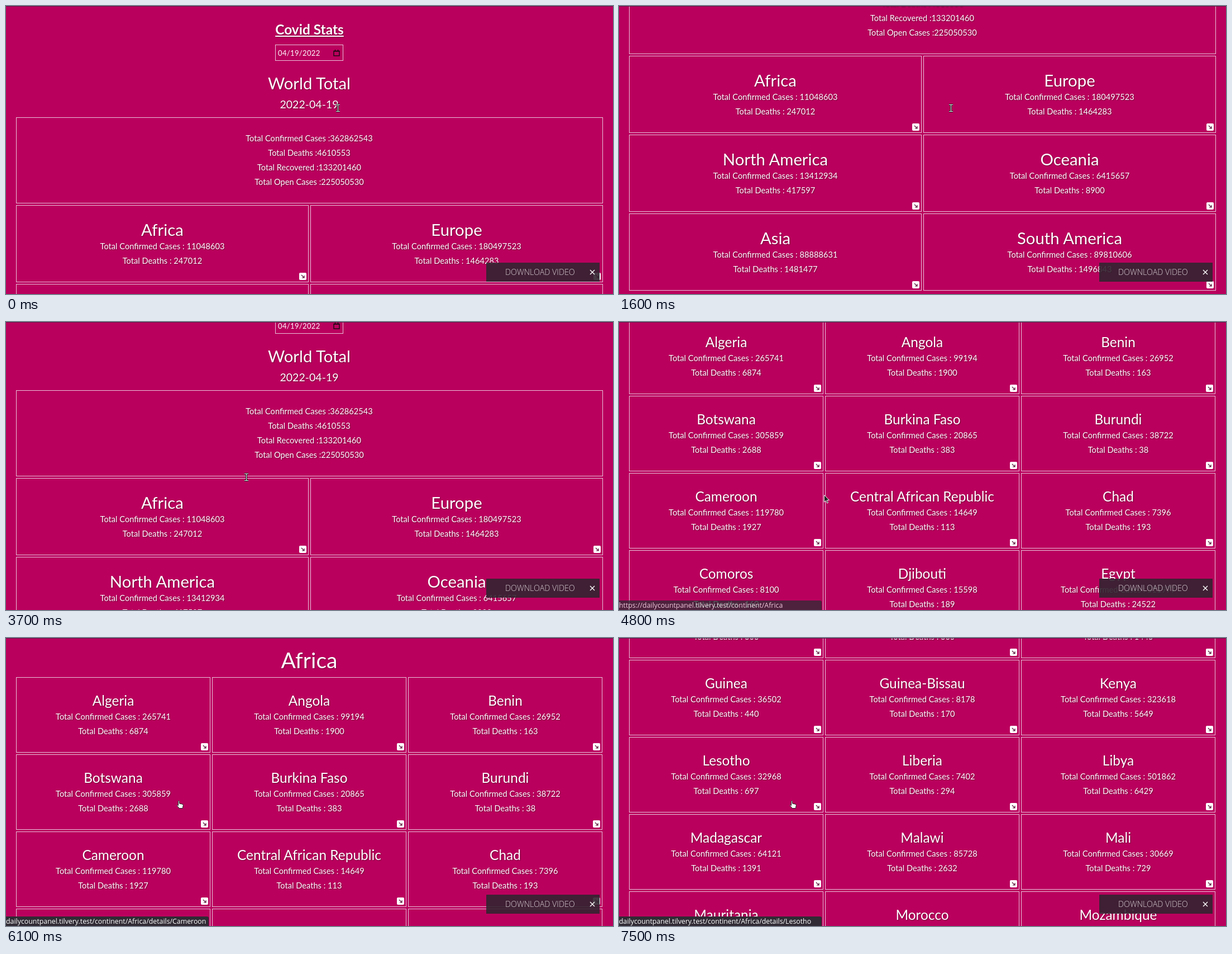
Recreate the animation shown at these times as an HTML page. Size 1087 px wide and 515 px high, loop 8 s.

```html
<!DOCTYPE html>
<html lang="en">
<head>
<meta charset="utf-8">
<title>Covid Stats</title>
<style>
html, body { margin: 0; width: 100%; height: 100%; overflow: hidden; background: #ba005d; }
#stage { position: relative; width: 1087px; height: 515px; overflow: hidden; color: #fff; font-family: Lato, sans-serif; }
#stage div, #stage svg { position: absolute; box-sizing: border-box; white-space: pre; }
.page { left: 0; top: 0; width: 1087px; }
.text { width: 600px; height: 40px; line-height: 40px; text-align: center; text-shadow: 1px 1px 2px rgba(0,0,0,.4); }
.box { border: 1px solid #e8c4da; }
.title { font-weight: bold; text-decoration: underline; }
#edge { left: 0; top: 0; width: 1087px; height: 1px; background: #5e1c47; }
#date { left: 487px; top: 74px; font-size: 13px; line-height: 20px; letter-spacing: .35px; }
#status { left: 0; top: 498px; width: 363px; height: 17px; background: #302b34; color: #fff; border-radius: 0 3px 0 0; font: 12.35px/18px "Open Sans", sans-serif; overflow: hidden; }
#download { left: 860px; top: 459px; width: 203px; height: 34px; background: rgba(50,36,48,.9); color: #ddd2d9; font: 300 14.3px/34px "Open Sans", sans-serif; padding-left: 34px; }
</style>
</head>
<body>
<div id="stage">
  <div class="page" id="home"></div>
  <div class="page" id="africa"></div>
  <div id="download">DOWNLOAD VIDEO<svg style="left:185px;top:12px" width="10" height="10"><path d="M1 1l8 8M9 1l-8 8" stroke="#fff" stroke-width="1.4"/></svg></div>
  <div id="status"></div>
  <svg id="cursor" width="16" height="20" stroke-linejoin="round">
    <g id="beam" fill="none">
      <path id="bar" d="M1 1.5h2.5l1 1 1-1H8M4.5 2.5v10M1 13.5h2.5l1-1 1 1H8" stroke="#222" stroke-width="3"/>
      <use href="#bar" style="stroke:#eee"/>
      <path d="M1 1.5h7M4.5 2v11M1 13.5h7" stroke="#eee"/>
    </g>
    <path id="arrow" d="M.5.5v12.5l3-2.7 2 4.7 2-.9-2-4.5h4z" fill="#222" stroke="#eee"/>
    <path id="hand" d="M3.5 1.5q1.200-1 2 .5v4l5.500 1.200q1.500.5 1.300 2l-1 5.300h-6.500l-1-2-3-3q.5-1.500 2.700 0z" fill="#fff" stroke="#222"/>
  </svg>
  <div id="edge"></div>
</div>
<script>
const $ = id => document.getElementById(id);
const home = $('home'), africa = $('africa');
const EM = 14.67; // body text size; headings are multiples of it

const add = (page, html) => page.insertAdjacentHTML('beforeend', html);
const text = (page, x, y, scale, str, cls = '') =>
  add(page, `<div class="text ${cls}" style="left:${x - 300}px;top:${y - 20}px;font-size:${EM * scale}px">${str}</div>`);
const box = (page, x, y, w, h) =>
  add(page, `<div class="box" style="left:${x}px;top:${y}px;width:${w}px;height:${h}px"></div>`);
const parse = list => list.split(/[;\n]/).map(s => s.trim().split(','));

// Stand-in figure for entries without one
const guess = (seed, max) => Math.floor(max * (.5 + .4 * Math.sin(seed * 12.9)));

// A grid of cards, each with a name, two figures and an arrow button
function grid(page, items, { columns, top, height, width, scale, nameY, max }) {
  items.forEach(([name, cases, deaths], i) => {
    const x = 18 + (width + 3) * (i % columns);
    const y = top + (height + 3) * Math.floor(i / columns);
    const mid = x + width / 2, gap = scale * EM + 4.5;
    box(page, x, y, width, height);
    text(page, mid, y + nameY, scale, name);
    const lineY = y + height - (height === 135 ? 64 : 64);
    text(page, mid, lineY, 1, 'Total Confirmed Cases : ' + (cases || guess(i, max)));
    text(page, mid, lineY + 26, 1, 'Total Deaths : ' + (deaths || guess(i, max / 60)));
    add(page, `<svg style="left:${x + width - 17}px;top:${y + height - 17}px" width="13" height="13">
      <rect width="13" height="13" rx="2" fill="#fff"/>
      <path d="M4 4l5 5M9 5v4H5" fill="none" stroke="#5a1038" stroke-width="1.2"/></svg>`);
  });
}

const continents = parse(`Africa,11048603,247012; Europe,180497523,1464283
North America,13412934,417597; Oceania,6415657,8900; Asia; South America`);
const countries = parse(`Algeria,265741,6874; Angola,99194,1900; Benin,26952,163
Botswana,305859,2688; Burkina Faso,20865,383; Burundi,38722,38
Cameroon,119780,1927; Central African Republic,14649,113; Chad,7396,193
Comoros,8100,160; Djibouti,15598,189; Egypt,511977,24522
Equatorial Guinea,15906,183; Eritrea,9733,103; Ethiopia,470288,7509
Gabon,47594,303; Gambia,11994,365; Ghana,161101,1445
Guinea,36502,440; Guinea-Bissau,8178,170; Kenya,323618,5649
Lesotho,32968,697; Liberia,7402,294; Libya,501862,6429
Madagascar,64121,1391; Malawi,85728,2632; Mali,30669,729
Mauritania; Morocco; Mozambique`);

text(home, 543.5, 42, 5 / 3, 'Covid Stats', 'title');
box(home, 482, 69, 122, 29);
add(home, `<div id="date">04/19/2022</div>
  <svg style="left:586px;top:78px" width="12" height="12"><path d="M1 2.5h10v8.5H1zM1 3h10M3.5 0v2M8.5 0v2" fill="none" stroke="#210814" stroke-width="1.5"/></svg>`);
text(home, 543, 138, 2, 'World Total');
text(home, 543, 176, 4 / 3, '2022-04-19');
box(home, 18, 199, 1051, 154);
['Confirmed Cases :362862543', 'Deaths :4610553', 'Recovered :133201460', 'Open Cases :225050530']
  .forEach((s, i) => text(home, 543, 237 + 26 * i, 1, 'Total ' + s));
grid(home, continents, { columns: 2, top: 356, height: 138, width: 524, scale: 2, nameY: 44, max: 1e8 });

text(africa, 543, 39, 8 / 3, 'Africa');
grid(africa, countries, { columns: 3, top: 70, height: 135, width: 348, scale: 5 / 3, nameY: 42, max: 2e5 });

// Sum of eased moves, each [start, end, amount]
const ease = p => p * p * (3 - 2 * p);
const travel = (moves, t) => moves.reduce((sum, [start, end, by]) =>
  sum + by * ease(Math.min(1, Math.max(0, (t - start) / (end - start)))), 0);

const scroll = [[600, 1100, 172], [1200, 1600, 95], [2400, 2800, -190], [4200, 4300, -1],
  [5200, 5800, -12], [6000, 6100, -64], [6400, 7107, 859]];
const cursorX = [[3300, 3800, -183], [3900, 4100, -45], [4700, 4800, 5], [5200, 5400, -62]];
const cursorY = [[3300, 3800, 106], [3900, 4100, 28], [5200, 5400, -19]];
const statusFade = [[3900, 4100, 1], [4690, 5050, -1], [5300, 5500, 1]];

const site = 'dailycountpanel.tilvery.test/continent/Africa';
function address(t) {
  if (t < 5300) return 'https://' + site;
  // Hover follows the scroll with a short delay
  const row = Math.floor((294 + travel(scroll, t - 80) - 70) / 138);
  return site + '/details/' + countries[row * 3][0];
}

function draw() {
  const t = Math.floor(performance.now() % 8000 / 100) * 100;
  const page = t < 4300 ? home : africa;
  for (const p of [home, africa]) p.style.display = p === page ? '' : 'none';
  page.style.transform = `translateY(${-Math.round(travel(scroll, t))}px)`;

  $('status').style.opacity = travel(statusFade, t);
  $('status').textContent = address(t);

  const shape = t < 4000 ? 'beam' : t >= 4800 && t < 5300 ? 'arrow' : 'hand';
  for (const id of ['beam', 'arrow', 'hand']) $(id).style.display = id === shape ? '' : 'none';
  $('cursor').style.left = Math.round(590 + travel(cursorX, t)) + 'px';
  $('cursor').style.top = Math.round(175 + travel(cursorY, t)) + 'px';
  requestAnimationFrame(draw);
}
draw();
</script>
</body>
</html>
```
